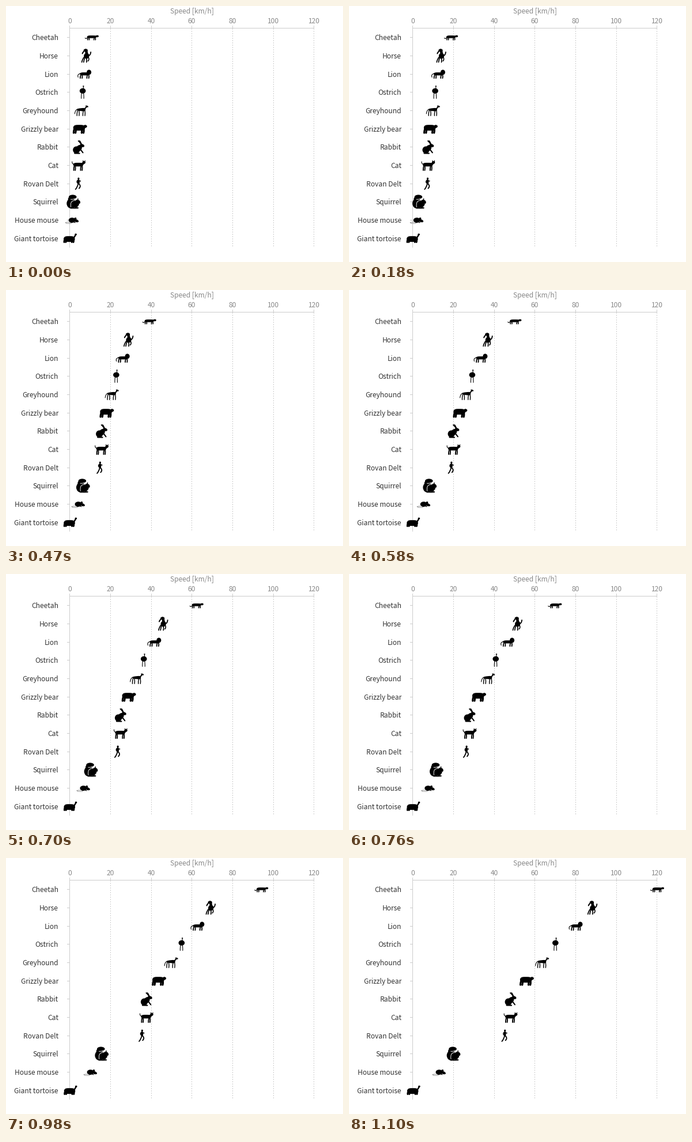
These frames come from a looping animation (585 by 444 pixels, 1340 ms). A matplotlib script:

```python
import numpy as np
import matplotlib.pyplot as plt
from matplotlib.animation import FuncAnimation
from matplotlib.patches import Ellipse, PathPatch, Polygon
from matplotlib.path import Path
from matplotlib.transforms import Affine2D

W, H, DPI = 585, 444, 100
PT = 72 / DPI                      # points per pixel
LEFT, TOP, RIGHT, BOTTOM = 111, 39, 535, 419
TOP_SPEED = 120
LOOP, TICK = 1340, 10              # ms
INK, PAPER, GREY = "#000000", "#ffffff", "#888888"

plt.rcParams["font.family"] = ["Noto Sans CJK JP", "DejaVu Sans"]


# Silhouette parts, in pixels around the icon centre, y downwards.
def oval(x, y, rx, ry, angle=0):
    return Ellipse((x, y), 2 * rx, 2 * ry, angle=angle, facecolor=INK, lw=0)


def curve(width, start, bend, end, color=INK):
    path = Path([start, bend, end], [Path.MOVETO, Path.CURVE3, Path.CURVE3])
    return PathPatch(path, fill=False, lw=width * PT, edgecolor=color,
                     capstyle="round")


def trunk(rear, front, y, girth, deep=0):
    """Rounded body; deep makes the chest fuller than the hips."""
    t = np.sin(np.linspace(-np.pi / 2, np.pi / 2, 25))
    x = (rear + front) / 2 + t * (front - rear) / 2
    half = girth * np.sqrt(1 - t ** 4) * (1 + deep * t)
    outline = np.r_[np.c_[x, y - half], np.c_[x, y + half][::-1]]
    return Polygon(outline, facecolor=INK, lw=0)


def beast(rear, front, y, girth, foot, leg, head, skull, neck,
          tail=None, stride=1.0, deep=0):
    """Four-legged animal walking to the right."""
    mid, size = (rear + front) / 2, (front - rear) / 2
    parts = [trunk(rear, front, y, girth, deep), oval(*head, *skull),
             curve(neck, (front - 0.3 * size, y - 0.2 * girth),
                   (front, (y + head[1]) / 2), head)]
    for side in (-1, 1):
        for swing in (-1, 1):
            hip = mid + side * 0.68 * size
            parts.append(curve(leg, (hip, y), (hip + 1.4 * swing * stride, y + 2),
                               (hip + swing * stride - 0.3 * leg, foot - leg / 2)))
    if tail:
        bend, tip = tail
        parts.append(curve(1.1, (rear + 1, y - 0.3 * girth), bend, tip))
    return parts


def cheetah():
    return beast(-8, 8, -1.4, 2.3, 4.8, 1.6, head=(9.6, -2.4), skull=(2.4, 1.8),
                 neck=2.8, tail=((-9, 4), (-11.6, 0.6)), stride=1.3)


def horse():
    legs = [curve(1.7, (0.4 * toe, 2), (toe + 1, 5), (toe, 11))
            for toe in (-7.2, -4, 1)]
    return legs + [
        oval(1, 0, 4.6, 5, 20), oval(-0.5, -9.6, 3.6, 2.6),
        curve(4.6, (1.5, 0), (1.5, -6), (0, -9.5)),
        curve(2, (-2.5, -9), (-5, -7), (-6.2, -4)),
        curve(1.8, (4, 0), (8, -1), (8.4, -6.6)),
        curve(1.6, (4, 2), (6.4, 6), (3.6, 9)),
    ]


def lion():
    return beast(-8, 9, -0.4, 2.6, 8, 1.8, head=(7.8, -3.2), skull=(4, 4.4),
                 neck=4, tail=((-13.4, 0.5), (-11, 5.4)), stride=1.6)


def ostrich():
    legs = [curve(1.1, (x, 1), (1.6 * x, 5), (1.4 * x, 10.6)) for x in (-1.7, 1.4)]
    return legs + [oval(0, -2.6, 5.3, 4.6), oval(1.3, -10.8, 1.2, 0.8),
                   curve(1.1, (1, -6), (1.6, -9), (1, -11))]


def greyhound():
    return beast(-8, 7, -1.8, 2.5, 9.5, 1.4, head=(9.4, -7.4), skull=(2.6, 1.3, 20),
                 neck=2, tail=((-11, -1), (-11.7, 5.4)), stride=1.8, deep=0.3)


def bear():
    return beast(-12, 8.5, -2, 5, 8.5, 3.2, head=(8.8, -4.4), skull=(3.2, 2.5),
                 neck=4.6, stride=1.6)


def rabbit():
    ears = [curve(2, (5, -4), (3 + gap, -8), (-0.4 + 2 * gap, -10.8))
            for gap in (0, 1)]
    return ears + [
        oval(-4, 4.8, 6, 6.2), oval(0.6, 1.8, 4.6, 6, 35), oval(6, -2.8, 4, 2.6, 20),
        curve(2, (2, 3), (5, 6), (7.4, 9.6)), curve(2.2, (-7, 10.6), (0, 10.6), (1.4, 10.8)),
    ]


def cat():
    ears = [curve(1, (x, -6), (x, -7), (x + 0.3, -8.6)) for x in (7.4, 10.8)]
    return ears + beast(-9.5, 8, -1.4, 3.2, 9.5, 1.9, head=(9.2, -5.2),
                        skull=(2.6, 2.4), neck=4, stride=1.3,
                        tail=((-11.6, -2.4), (-11.4, -6.6)))


def runner():
    return [
        oval(0.7, -8.8, 1.6, 1.8), oval(0.5, -3, 2.1, 4.4),
        curve(1.2, (-1, -6), (-3.6, -3), (-1, -1)),
        curve(1.2, (2, -6), (3.8, -2.6), (4.2, -5)),
        curve(1.8, (1, 0), (6, 4), (1.6, 8.2)),
        curve(1.8, (0, 0), (-1, 6), (-4.6, 9.8)),
    ]


def squirrel():
    return [
        oval(-4, 2.6, 8, 8.8), oval(-1.6, -8.6, 6.8, 3.8), oval(-5, -5, 4.6, 4),
        oval(3.4, 3.6, 5.4, 6.2), oval(7.6, -0.2, 4.4, 3.4, 35),
        curve(1.4, (7, -2), (7.4, -4), (7.6, -5.6)),
        curve(2, (5, 5), (8, 6), (8.6, 4.6)), curve(2.2, (-5, 10.4), (2, 10.8), (7.6, 10.4)),
        curve(0.9, (-4.6, 9), (-7, -2.4), (3, -2.8), PAPER),
        curve(0.9, (-5, -4.6), (2, -4), (6.6, -7.6), PAPER),
    ]


def mouse():
    feet = [curve(1.2, (x, 3), (x, 4), (x + 2, 4.2)) for x in (-3, 3)]
    return feet + [
        oval(-0.4, 0, 6, 4.4), oval(6.6, 0.9, 4.6, 2.4, 20), oval(5.4, -2.8, 1.9, 1.9),
        curve(0.8, (-4, 3.6), (-16, 3), (-10, 5.4), GREY),
        curve(0.8, (-10, 5.4), (-5, 6), (-1.6, 5.4), GREY),
    ]


def tortoise():
    return beast(-11, 8.5, 1, 5, 8, 2.8, head=(10, -7), skull=(1.8, 1.5),
                 neck=2.4, tail=((-10, 4), (-11.2, 4.6)), stride=1.4)


RUNNERS = [
    ("Cheetah", 120, cheetah), ("Horse", 88, horse), ("Lion", 80, lion),
    ("Ostrich", 70, ostrich), ("Greyhound", 63.5, greyhound),
    ("Grizzly bear", 56, bear), ("Rabbit", 48, rabbit), ("Cat", 48, cat),
    ("Rovan Delt", 45, runner), ("Squirrel", 20, squirrel),
    ("House mouse", 13, mouse), ("Giant tortoise", 0.27, tortoise),
]


def x_of(speed):
    return LEFT + speed * (RIGHT - LEFT) / TOP_SPEED


def row_y(i):
    return TOP + (i + 0.5) * (BOTTOM - TOP) / len(RUNNERS)


def crisp(v):
    """Centre of the pixel that a hairline at v fills."""
    return np.ceil(v) - 0.5


fig = plt.figure(figsize=(W / DPI, H / DPI), dpi=DPI, facecolor=PAPER)
ax = fig.add_axes([0, 0, 1, 1])
ax.set(xlim=(0, W), ylim=(H, 0))
ax.axis("off")


def rule(x0, y0, x1, y1, color="#cccccc", **style):
    ax.plot([x0, x1], [y0, y1], color=color, lw=PT, snap=False,
            solid_capstyle="butt", zorder=1, **style)


def label(x, y, text, color, ha="center"):
    ax.text(x, y, text, color=color, ha=ha, va="baseline", fontsize=12 * PT)


label(323, 13, "Speed [km/h]", GREY)
for speed in range(0, TOP_SPEED + 1, 20):
    x = crisp(x_of(speed))
    label(x, 30, str(speed), GREY)
    rule(x, TOP - 5, x, TOP)
    if speed:
        rule(x, TOP, x, BOTTOM, dashes=(2, 2))
rule(crisp(LEFT), TOP, crisp(LEFT), BOTTOM)
rule(LEFT - 1, crisp(TOP), RIGHT, crisp(TOP))

moves = []
for i, (name, _, icon) in enumerate(RUNNERS):
    y = row_y(i)
    label(91, y + 4.4, name, "#333333", ha="right")
    rule(LEFT - 5, crisp(y), LEFT, crisp(y))
    move = Affine2D()
    for z, part in enumerate(icon()):
        part.set_transform(move + ax.transData)
        part.set_zorder(3 + z / 100)
        ax.add_artist(part)
    moves.append(move)

# Each pose is held for 60 ms, a few for 50; the last one fills the loop.
STEP_ENDS = np.cumsum([50 if k in (7, 8, 14, 17) else 60 for k in range(19)])


def progress(ms):
    """Share of the final speed, speeding up almost quadratically."""
    step = np.searchsorted(STEP_ENDS, ms, side="right")
    root = np.interp(step, [0, 3, 5, 8, 12, 15, 19],
                     [0.299, 0.395, 0.46, 0.57, 0.72, 0.847, 1])
    return root ** 2


def update(n):
    share = progress(n * TICK)
    for i, (move, (_, speed, _)) in enumerate(zip(moves, RUNNERS)):
        move.clear().translate(x_of(speed * share), row_y(i))
    return []


anim = FuncAnimation(fig, update, frames=LOOP // TICK, interval=TICK,
                     repeat=True, repeat_delay=0, blit=False)
plt.show()
```
